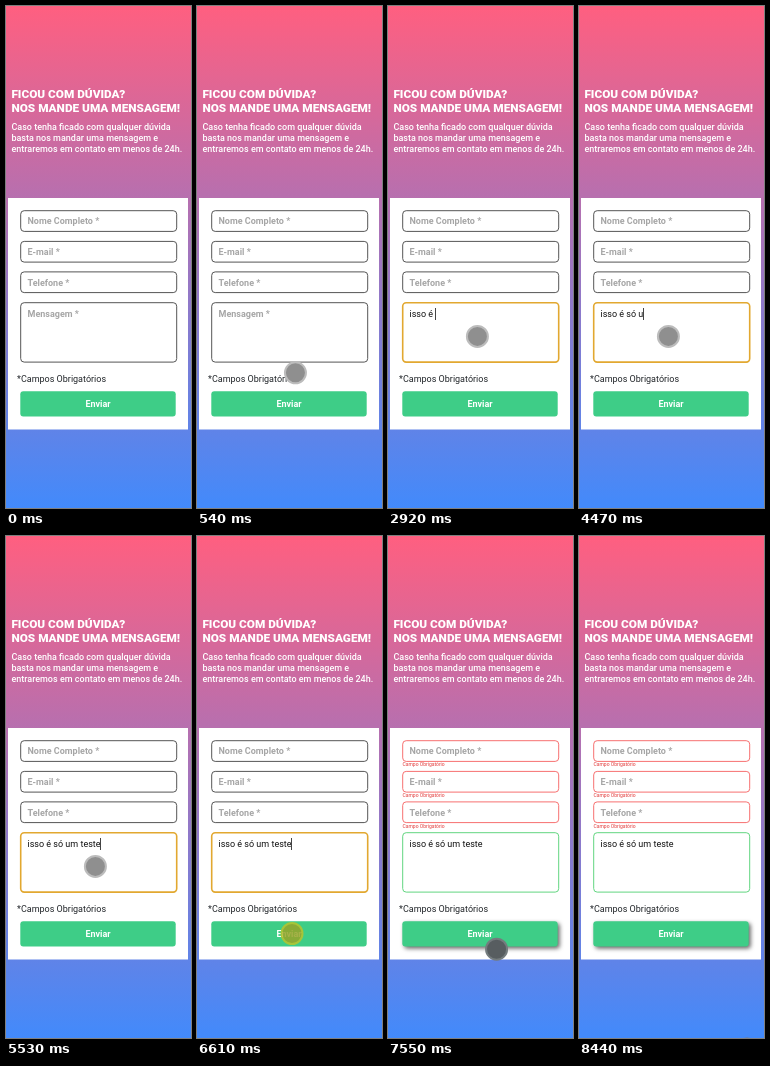
Write an HTML page that moves like this. It is 185 px wide and 502 px high and loops after 8570 ms.

```html
<!DOCTYPE html>
<html lang="pt-BR">
<head>
<meta charset="utf-8">
<style>
html, body { margin: 0; width: 185px; height: 502px; overflow: hidden; }
svg { display: block; font: 9px Roboto, sans-serif; background: linear-gradient(#ff5f80, #428afb); }
.title { font-size: 11.8px; font-weight: 900; }
.bold { font-weight: 700; }
.hint { fill: #a6a6a6; font-weight: 700; }
.field { fill: #fff; }
#errors { font-size: 5px; fill: #e23b3b; }
</style>
</head>
<body>
<svg width="185" height="502">
  <g fill="#fff">
    <text class="title" x="5.4" y="92">FICOU COM DÚVIDA?</text>
    <text class="title" x="5.4" y="106">NOS MANDE UMA MENSAGEM!</text>
    <g font-weight="500">
      <text x="5.4" y="124">Caso tenha ficado com qualquer dúvida</text>
      <text x="5.4" y="135">basta nos mandar uma mensagem e</text>
      <text x="5.4" y="146">entraremos em contato em menos de 24h.</text>
    </g>
    <rect x="2" y="192" width="180" height="231.5"/>
  </g>
  <g id="fields">
    <rect class="field" x="14.7" y="204.7" width="156" height="20.7" rx="3.5"/>
    <rect class="field" x="14.7" y="235.4" width="156" height="20.7" rx="3.5"/>
    <rect class="field" x="14.7" y="265.9" width="156" height="20.7" rx="3.5"/>
    <rect class="field" x="14.7" y="296.7" width="156" height="59.4" rx="3.5"/>
  </g>
  <text class="hint" x="21.5" y="218">Nome Completo *</text>
  <text class="hint" x="21.5" y="249">E-mail *</text>
  <text class="hint" x="21.5" y="280">Telefone *</text>
  <text class="hint" x="21.5" y="311" id="hint">Mensagem *</text>
  <g id="errors">
    <text x="14.5" y="230">Campo Obrigatório</text>
    <text x="14.5" y="261">Campo Obrigatório</text>
    <text x="14.5" y="292">Campo Obrigatório</text>
  </g>
  <text id="typed" x="21.5" y="311" fill="#111" xml:space="preserve"></text>
  <rect id="caret" y="302" width="1" height="12" fill="#444"/>
  <text x="11" y="376" fill="#212529">*Campos Obrigatórios</text>
  <rect id="button" x="14.3" y="385.2" width="155.4" height="25.3" rx="3" fill="#3ecd87"/>
  <text class="bold" x="92" y="401" text-anchor="middle" fill="#fff">Enviar</text>
  <circle id="touch" r="10.5" stroke-width="2"/>
</svg>
<script>
const LOOP = 8570;
const MESSAGE = 'isso é só um teste';
const KEYS = [1930, 2210, 2410, 2540, 2670, 2850, 2920, 3340, 3870, 4070, 4470, 4740, 4810,
  5140, 5270, 5340, 5400, 5530];
// time, x, y of the touch pointer
const PATH = [[260, 121, 451], [340, 115, 427], [500, 101, 376], [660, 91, 340], [800, 89.4, 330.4],
  [6000, 89.4, 330.4], [6270, 92, 365], [6540, 95, 397.5], [6890, 95, 397.5], [7280, 108, 391],
  [7480, 108, 391], [7550, 108.5, 413], [7800, 125, 455], [8170, 152, 512], [8440, 168, 513], [LOOP, 168, 513]];

const el = id => document.getElementById(id);
const fields = [...el('fields').children];
const show = (node, on) => node.style.visibility = on ? 'visible' : 'hidden';
const ramp = (t, from, to) => Math.min(1, Math.max(0, (t - from) / (to - from)));
const mix = (a, b, k) => `rgb(${a.map((v, i) => Math.round(v + (b[i] - v) * k))})`;

const DARK = [85, 85, 85], GOLD = [226, 168, 48], RED = [247, 112, 112], GREEN = [98, 214, 128];

function pointerAt(t) {
  const i = Math.max(1, PATH.findIndex(p => p[0] > t));
  const [a, b] = [PATH[i - 1], PATH[i]];
  const k = ramp(t, a[0], b[0]);
  return [a[1] + (b[1] - a[1]) * k, a[2] + (b[2] - a[2]) * k];
}

function draw(t) {
  const focused = t >= 1000 && t < 6890;
  const checked = ramp(t, 6820, 7280);
  fields.forEach((field, i) => {
    const area = i === 3;
    const from = area && t >= 1000 ? GOLD : DARK;
    field.setAttribute('stroke', mix(from, area ? GREEN : RED, checked));
    field.setAttribute('stroke-width', area && focused ? 1.6 : 1);
  });
  show(el('errors'), t >= 6890);

  const count = KEYS.filter(k => k <= t).length;
  const typed = el('typed');
  typed.textContent = MESSAGE.slice(0, count);
  show(el('hint'), !count);
  const lastKey = count ? KEYS[count - 1] : 1000;
  const blinkOn = Math.floor((t - lastKey) / 530) % 2 === 0;
  show(el('caret'), focused && (blinkOn || count > 0 && count < KEYS.length));
  el('caret').setAttribute('x', Math.round(21 + typed.getComputedTextLength()));

  const lift = ramp(t, 6610, 6820);
  el('button').style.filter = lift ? `drop-shadow(2px 2px 2px rgba(0,0,0,${0.6 * lift}))` : 'none';

  const touch = el('touch');
  const [x, y] = pointerAt(t);
  const pressed = t >= 6440 && t < 6890;
  const [fill, ring] = pressed ? ['#98a42a', '#b9c42c'] : t < 6440 ? ['#8f8f8f', '#bcbcbc'] : ['#575d60', '#747c7e'];
  touch.setAttribute('cx', x);
  touch.setAttribute('cy', y);
  touch.setAttribute('fill', fill);
  touch.setAttribute('stroke', ring);
  touch.style.opacity = pressed ? 0.85 : 1;
  show(touch, t >= 260);
}

const start = performance.now();
function tick() {
  draw((performance.now() - start) % LOOP);
  requestAnimationFrame(tick);
}
tick();
</script>
</body>
</html>
```
